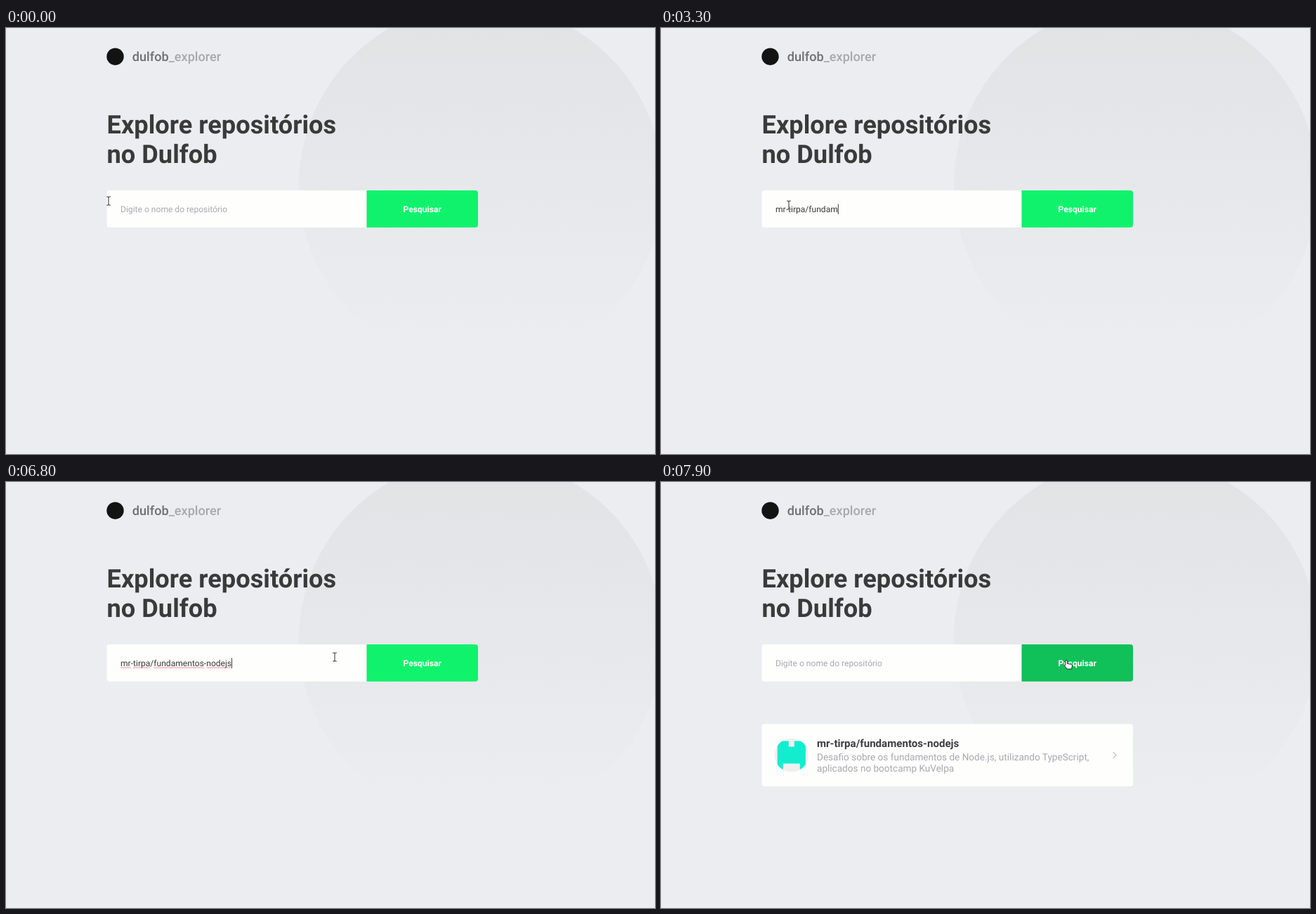
Write an HTML page that moves like this. It is 924 px wide and 606 px high and loops after 8000 ms.

```html
<!DOCTYPE html>
<html lang="pt-BR">
<head>
<meta charset="utf-8">
<title>Explorador de repositórios</title>
<style>
  html, body { margin: 0; width: 100%; height: 100%; overflow: hidden; background: #ecedf0; }
  svg { display: block; width: 924px; height: 606px; }
  text { font: 12.08px Roboto, sans-serif; text-rendering: geometricPrecision; fill: #a8a8b0; white-space: pre; }
  .logo { font-size: 18.12px; font-weight: 500; }
  .title { font-size: 36.24px; font-weight: 700; fill: #3a3a3a; }
  .button { font-weight: 700; fill: #fff; text-anchor: middle; }
  .name { font-size: 15.1px; font-weight: 700; fill: #3d3d45; }
  .about { font-size: 13.59px; }
</style>
</head>
<body>
<svg viewBox="0 0 924 606">
  <defs>
    <linearGradient id="fade" gradientUnits="userSpaceOnUse" x1="0" y1="0" x2="0" y2="455">
      <stop stop-color="#e2e3e5"/>
      <stop offset="1" stop-color="#ecedf0"/>
    </linearGradient>
    <pattern id="wave" width="3" height="2.4" patternUnits="userSpaceOnUse" y="262.9">
      <path d="M0 1.7L1.5.6L3 1.7" fill="none" stroke="#d9534f" stroke-width=".8"/>
    </pattern>
    <clipPath id="round"><circle cx="185.8" cy="388.5" r="24.1"/></clipPath>
  </defs>

  <circle cx="676" cy="224" r="259" fill="url(#fade)"/>
  <circle cx="155.5" cy="40.7" r="12.2" fill="#131313"/>
  <text class="logo" x="179.8" y="47"><tspan fill="#6f6f78">dulfob</tspan>_explorer</text>
  <text class="title" x="143.5" y="149.7">Explore repositórios</text>
  <text class="title" x="143.5" y="192">no Dulfob</text>

  <path d="M513.5 231H147.3a3.8 3.8 0 0 0-3.8 3.8V280a3.8 3.8 0 0 0 3.8 3.8H513.5z" fill="#fefefd"/>
  <path id="button" d="M513.5 231H668.2a3.8 3.8 0 0 1 3.8 3.8V280a3.8 3.8 0 0 1-3.8 3.8H513.5z"/>
  <text class="button" x="592.7" y="261.7">Pesquisar</text>
  <text id="field" x="163" y="261.7"></text>
  <g id="waves" fill="url(#wave)"></g>
  <rect id="caret" y="250.4" width=".9" height="14.4" fill="#2a2a2a"/>

  <g id="card">
    <rect x="143.5" y="344.3" width="528.5" height="88.6" rx="3.8" fill="#fefefd"/>
    <g id="avatar" clip-path="url(#round)">
      <path d="M161 364h50v50h-50z" fill="#f0f0f0"/>
      <path d="M165.7 368.4h16.1v8h8v-8h16.1v40.2h-8.1v-8h-24.1v8h-8z" fill="#12edd0"/>
    </g>
    <text class="name" x="222" y="376.6">mr-tirpa/fundamentos-nodejs</text>
    <text class="about" x="222" y="395.8">Desafio sobre os fundamentos de Node.js, utilizando TypeScript,</text>
    <text class="about" x="222" y="411.7">aplicados no bootcamp KuVelpa</text>
    <path d="M643.8 384.2L648 388.5L643.8 392.8" fill="none" stroke="#b9b9c1" stroke-width="1.1"/>
  </g>

  <g id="beam" fill="none" stroke-linecap="square">
    <path d="M-2.3-6H-1Q0-6 0-5Q0-6 1-6H2.3M0-5V5M-2.3 6H-1Q0 6 0 5Q0 6 1 6H2.3" stroke="#fff" stroke-width="2" opacity=".7"/>
    <path d="M-2.3-6H-1Q0-6 0-5Q0-6 1-6H2.3M0-5V5M-2.3 6H-1Q0 6 0 5Q0 6 1 6H2.3" stroke="#2b2b2b"/>
  </g>
  <path id="hand" d="M-4.3-5.2a1.3 1.3 0 0 1 2.6 0V-1.6L3.8-.7Q5.7-.3 5.5 1.6L4.6 6H-1.8L-5.7 1.6Q-6-.2-4.3.7z"
    fill="#fff" stroke="#222" stroke-width="1" stroke-linejoin="round"/>
</svg>

<script>
const [button, field, waves, caret, card, avatar, beam, hand] =
  ['button', 'field', 'waves', 'caret', 'card', 'avatar', 'beam', 'hand'].map(id => document.getElementById(id));
const query = 'mr-tirpa/fundamentos-nodejs';
const hint = 'Digite o nome do repositório';

// Ticks of 100 ms: [tick, characters typed]
const typing = [
  [12, 1], [13, 2], [15, 3], [17, 5], [19, 7], [21, 8], [23, 9],
  [28, 10], [29, 11], [30, 12], [32, 14], [33, 15], [35, 17], [36, 18], [38, 20],
  [44, 21], [46, 22], [47, 23], [49, 24], [50, 25], [52, 27], [76, 0]
];
// [tick, x, y]
const path = [[0, 146, 246], [3, 186, 251], [4, 182, 252], [65, 182, 252], [68, 468, 249], [72, 580, 260], [80, 580, 260]];
const caretOn = [[7, 11], [12, 58], [62, 69]];

const show = (el, on) => el.setAttribute('visibility', on ? 'inherit' : 'hidden');
const mix = (a, b, k) => a + (b - a) * k;

function pointer(tick) {
  const i = path.findIndex(p => p[0] > tick);
  const [t0, x0, y0] = path[i - 1], [t1, x1, y1] = path[i];
  const k = (tick - t0) / (t1 - t0);
  return [mix(x0, x1, k), mix(y0, y1, k)];
}

function underline() {
  for (const { 0: word, index } of query.matchAll(/\w+/g)) {
    const rect = document.createElementNS('http://www.w3.org/2000/svg', 'rect');
    rect.setAttribute('x', field.getStartPositionOfChar(index).x);
    rect.setAttribute('y', 262.9);
    rect.setAttribute('width', field.getSubStringLength(index, word.length));
    rect.setAttribute('height', 2.4);
    waves.append(rect);
  }
}

function draw(tick) {
  const count = typing.reduce((n, [t, c]) => tick >= t ? c : n, 0);
  field.textContent = count ? query.slice(0, count) : hint;
  field.style.fill = count ? '#3a3a3a' : '';
  caret.setAttribute('x', 163 + (count ? field.getComputedTextLength() : 0));
  show(caret, caretOn.some(([a, b]) => tick >= a && tick < b));
  show(waves, tick >= 62 && tick < 74);
  show(card, tick >= 76);
  show(avatar, tick >= 79);

  const [x, y] = pointer(tick), over = x > 513;
  for (const el of [beam, hand]) el.setAttribute('transform', `translate(${x} ${y})`);
  show(beam, !over);
  show(hand, over);
  const k = Math.max(0, Math.min(1, (tick - 69.6) / 2));
  button.setAttribute('fill', `rgb(16 ${mix(242, 192, k)} ${mix(108, 88, k)})`);
}

let last = -1;
function frame() {
  const tick = Math.floor(performance.now() % 8000 / 100);
  if (tick !== last) draw(last = tick);
  requestAnimationFrame(frame);
}

field.textContent = query;
underline();
frame();
</script>
</body>
</html>
```
